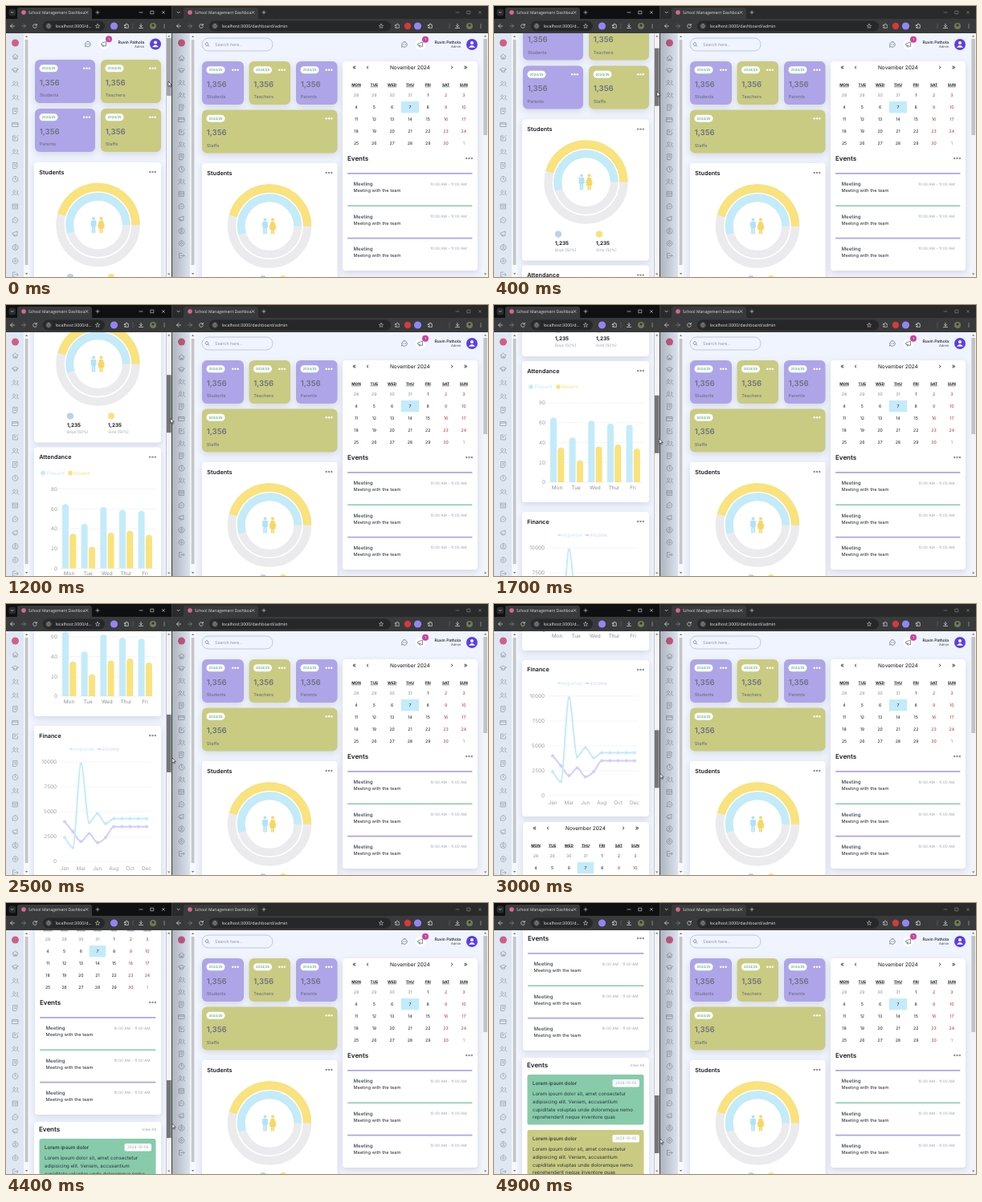
Animation of 600x338 px, one loop 5000 ms. Source, as an HTML page:

```html
<!DOCTYPE html>
<html lang="en">
<head>
<meta charset="utf-8">
<title>School Management Dashboard</title>
<style>
html, body { margin: 0; width: 100%; height: 100%; overflow: hidden; background: #0c0d0e; }
svg { display: block; width: 100vw; height: 100vh; }
text { font-family: Inter, sans-serif; white-space: pre; text-rendering: geometricPrecision; }
.chrome text { font-family: "Open Sans", sans-serif; }
.card { filter: drop-shadow(0 3px 4px #0000001c); }
.line { fill: none; stroke-linecap: round; stroke-linejoin: round; }
</style>
</head>
<body>
<svg id="stage" viewBox="0 0 600 338"></svg>
<script>
const PURPLE = '#aea5e8', OLIVE = '#c9cb82', GREEN = '#87cbaa', SKY = '#c3ebfa',
  YELLOW = '#fae27c', LILAC = '#cfceff', GRAY = '#6b7280', PALE = '#9ca3af', INK = '#15171c', PAGE = '#f0f4fe';

const rect = (x, y, w, h, fill, r = 0, extra = '') =>
  `<rect x="${x}" y="${y}" width="${w}" height="${h}" rx="${r}" fill="${fill}" ${extra}/>`;
const card = (x, y, w, h, fill = '#fff', r = 4) => rect(x, y, w, h, fill, r, 'class="card"');
const dot = (x, y, r, fill, extra = '') => `<circle cx="${x}" cy="${y}" r="${r}" fill="${fill}" ${extra}/>`;
const line = (d, stroke, w = .7, extra = '') =>
  `<path class="line" d="${d}" stroke="${stroke}" stroke-width="${w}" ${extra}/>`;
// y is the vertical middle of the text
const text = (x, y, s, size, fill = INK, weight = 400, anchor = 'start', extra = '') =>
  `<text x="${x}" y="${y}" dy=".36em" font-size="${size}" fill="${fill}" font-weight="${weight}" text-anchor="${anchor}" ${extra}>${s}</text>`;
const icon = (x, y, d, stroke = GRAY, w = .7) => line(d, stroke, w, `transform="translate(${x} ${y})"`);
const more = (right, y, fill = '#8b8f98') => [0, 3.3, 6.6].map(d => dot(right - 1.2 - d, y, 1.2, fill)).join('');
const each = (list, f) => list.map(f).join('');

const ICON = {
  home: 'M-3.5 0L0-3.2 3.5 0M-2.5-1V3H2.5V-1M-.7 3V1H.7V3',
  cap: 'M-4-1L0-3 4-1 0 1zM-2 0V2Q0 3.5 2 2V0',
  users: 'M-1.5-3a1.5 1.5 0 1 0 .1 0M-4 3Q-1.5-1 1 3M2-2.5a1.3 1.3 0 0 1 0 2.6M2 1Q3.5 1 4 3',
  doc: 'M-2.5-3.5H2.5V1L1 3.5H-2.5zM-1-1.5H1M-1 .5H1',
  pay: 'M-3.5-2.5H3.5V2.5H-3.5zM-3.5-.8H3.5',
  edit: 'M3 0V3H-3V-3H0M-1 1L3.5-3.5M-1.5-1H0',
  clock: 'M0-3.5a3.5 3.5 0 1 0 .1 0M0-2V0L1.5 1',
  calendar: 'M-3-3H3V3H-3zM-3-1H3M-1.5 1H1.5',
  chat: 'M0-3.3a3.3 3.3 0 1 1-2.2 5.8L-3.4 3.2-3 1.5A3.3 3.3 0 0 1 0-3.3M-1.4 0h.2M0 0h.2M1.4 0h.2',
  news: 'M-3-1L2.5-3V2.5L-3 1zM-2 1.2L-1.5 3H0',
  user: 'M0-3.6a3.6 3.6 0 1 0 .1 0M0-2a1.2 1.2 0 1 0 .1 0M-2.2 2.6Q0-.2 2.2 2.6',
  gear: 'M0-3.4a3.4 3.4 0 1 0 .1 0M0-1.3a1.3 1.3 0 1 0 .1 0',
  exit: 'M0-3H-3V3H0M-1 0H3.5M2-1.5L3.5 0 2 1.5',
  back: 'M2.5 0H-2.5M0-2.5L-2.5 0 0 2.5',
  forward: 'M-2.5 0H2.5M0-2.5L2.5 0 0 2.5',
  reload: 'M2-1.3A2.4 2.4 0 1 0 2.3.8M2.3-2.6V-1H.7',
  info: 'M0-2.2a2.2 2.2 0 1 0 .1 0M0-.2V1M0-1.1v.1',
  star: 'M0-2.7L.8-.8 2.7-.7 1.2.6 1.7 2.5 0 1.5-1.7 2.5-1.2.6-2.7-.7-.8-.8z',
  puzzle: 'M-2.3-1.4H-.6a1 1 0 1 1 1.6 0H2.3V2.4H-2.3V1.2a1 1 0 1 0 0-1.4z',
  save: 'M0-2.7V1M-1.7-.6L0 1.1 1.7-.6M-2.5 2.5H2.5',
  menu: 'M0-2v.1M0 0v.1M0 2v.1',
  close: 'M-1.5-1.5L1.5 1.5M1.5-1.5L-1.5 1.5',
  plus: 'M-2 0H2M0-2V2',
  min: 'M-2 0H2',
  max: 'M-1.8-1.8H1.8V1.8H-1.8z',
  down: 'M-1.5-.7L0 .8 1.5-.7'
};
const MENU = ['home', 'cap', 'users', 'users', 'doc', 'pay', 'edit', 'users', 'doc', 'clock',
  'users', 'calendar', 'chat', 'news', 'user', 'gear', 'exit'];

// monotone cubic tangents through [x, y] points
function slopes(p) {
  const d = p.slice(1).map((q, i) => (q[1] - p[i][1]) / (q[0] - p[i][0]));
  return p.map((_, i) => {
    const a = d[i - 1] ?? d[i], b = d[i] ?? a;
    return a * b <= 0 ? 0 : Math.sign(a) * Math.min(2 * Math.abs(a), 2 * Math.abs(b), Math.abs(a + b) / 2);
  });
}

function browser(x, w, url, pill, star, strip) {
  const ctl = '#e3e3e3', end = x + w, frame = x ? '#8d8e90' : ctl;
  let s = rect(x, 0, w, 17, strip) + rect(x, 16, w, 18, '#393a3b') +
    `<path d="M${x + 12} 17Q${x + 14} 17 ${x + 14} 14V5Q${x + 14} 2 ${x + 17} 2H${x + 104}Q${x + 107} 2 ${x + 107} 5V14Q${x + 107} 17 ${x + 109} 17z" fill="#393a3b"/>` +
    rect(x + 3.5, 3.5, 8.5, 9, '#2b2c2d', 3) + icon(x + 7.7, 8, ICON.down, ctl) +
    dot(x + 22, 8, 2.8, '#d9678f') + text(x + 28, 8, 'School Management Dashboa', 5.05, ctl) +
    icon(x + 100.5, 8, ICON.close, ctl, .6) + icon(x + 114, 8, ICON.plus, ctl, .6) +
    icon(end - 38, 8, ICON.min, frame, .6) + icon(end - 24, 8, ICON.max, frame, .6) + icon(end - 10, 8, ICON.close, frame, .6) +
    icon(x + 8, 25, ICON.back, ctl) + icon(x + 22, 25, ICON.forward, '#85878a') + icon(x + 36, 25, ICON.reload, ctl) +
    rect(x + 46, 18.5, pill, 13, '#262728', 6.5) + dot(x + 53, 25, 4.3, '#3c3d3e') + icon(x + 53, 25, ICON.info, ctl, .5) +
    text(x + 61.5, 25, url, 5.3, '#e8e8e8') + icon(star, 25, ICON.star, ctl, .5);
  const puzzle = x ? end - 72 : 150;
  s += dot(puzzle - 15.5, 25, 4.6, '#9384f5') + icon(puzzle, 25, ICON.puzzle, ctl) +
    line(`M${end - 48} 22V28`, '#6a6c6e', .6) + icon(end - 38, 25, ICON.save, ctl) +
    dot(end - 23, 25, 4, '#6d7b55') + dot(end - 23, 24, 1.5, '#38302a') + icon(end - 9, 25, ICON.menu, ctl, 1);
  if (x) s += icon(487, 25, ICON.puzzle, '#c8c8c8') + dot(500, 25, 4.2, '#d8383a');
  return `<g class="chrome">${s}</g>`;
}

const arrow = (x, y, k) => `<path d="M${x - 1.7} ${y + k}h3.4L${x} ${y - k}z" fill="#777"/>`;

function sidebar(x, top, step) {
  return rect(x, 34, 22, 304, '#dfe7f3') + dot(x + 11.5, 46, 4.5, '#cf5f88') +
    each(MENU, (n, i) => icon(x + 11.5, top + step * i, ICON[n], '#8a92a0', .65)) +
    rect(x + 22, 34, 7, 304, '#f6f8fb') + rect(x + 23.7, 42, 3.8, 281, '#c3c5c8') +
    arrow(x + 25.6, 38, 1) + arrow(x + 25.6, 334, -1);
}

function header(x, y) {
  return icon(x - 84, y, ICON.chat, '#566', .7) + dot(x - 64, y, 6.5, '#fff') + icon(x - 64, y, ICON.news, '#566') +
    dot(x - 58, y - 6.2, 4, '#c9419f') + text(x - 58, y - 6.2, '1', 4, '#fff', 500, 'middle') +
    text(x - 14, y - 2.7, 'Ruvin Pathola', 5, INK, 500, 'end') + text(x - 14, y + 2.6, 'Admin', 4, '#444', 400, 'end') +
    dot(x, y, 7, '#5b3fe6') + dot(x, y - 2, 2, '#fff') + `<path d="M${x - 4} ${y + 3.7}Q${x} ${y - 1.6} ${x + 4} ${y + 3.7}z" fill="#fff"/>`;
}

function stat(x, y, w, label, fill) {
  return card(x, y, w, 54, fill, 6) + rect(x + 5.5, y + 6.2, 23, 9, '#fff', 4.5) +
    text(x + 17, y + 10.7, '2024/25', 4.2, '#4fa87a', 500, 'middle') + more(x + w - 6, y + 10.7, '#fff') +
    text(x + 5.7, y + 28.3, '1,356', 9.6, GRAY, 600) + text(x + 5.7, y + 44.2, label, 5.6, GRAY, 500);
}

const panel = (x, y, w, h, title) =>
  card(x, y, w, h) + text(x + 6.3, y + 12, title, 7.2, INK, 600) + more(x + w - 6, y + 12);

function arc(x, y, r, w, deg, color) {
  const a = deg * Math.PI / 180;
  return dot(x, y, r, 'none', `stroke="#ebebed" stroke-width="${w}"`) +
    `<path d="M${x + r} ${y}A${r} ${r} 0 ${+(deg > 180)} 0 ${x + r * Math.cos(a)} ${y - r * Math.sin(a)}" fill="none" stroke="${color}" stroke-width="${w}"/>`;
}

function donut(x, y) {
  return arc(x, y, 47, 10.4, 164.5, YELLOW) + arc(x, y, 35.2, 9.8, 196, SKY) +
    `<g transform="translate(${x - 5.5} ${y})" fill="#b3e2f5">` + dot(0, -8, 2, '#b3e2f5') +
    `<path d="M-3.4-4.5Q-3.4-5.5-2.4-5.5H2.4Q3.4-5.5 3.4-4.5V2H2.2V10H.3V3H-.3V10H-2.2V2H-3.4z"/></g>` +
    `<g transform="translate(${x + 4} ${y})" fill="#f7d765">` + dot(0, -8, 2, '#f7d765') +
    `<path d="M-2-5.5H2L4.6 1.5 3.4 2 3 1 4 4.5H2V10H.3V5H-.3V10H-2V4.5H-4L-3 1-3.4 2-4.6 1.5z"/></g>`;
}

function attendance() {
  const base = 528, k = 99 / 80;
  const days = [['Mon', 65, 35], ['Tue', 45, 22], ['Wed', 62, 36], ['Thur', 59, 38], ['Fri', 58, 34]];
  const bar = (x, v, c) => `<path d="M${x} ${base}v${4 - v * k}q0-4 4-4t4 4V${base}z" fill="${c}"/>`;
  return panel(35, 377, 158, 176, 'Attendance') +
    dot(46, 409, 2.8, SKY) + text(50.5, 409, 'Present', 6.2, SKY) + dot(80, 409, 2.8, YELLOW) + text(84, 409, 'Absent', 6.2, YELLOW) +
    each([0, 20, 40, 60, 80], v => line(`M67 ${base - v * k}H186`, '#ddd', .4, v ? 'stroke-dasharray="1.2 1.2"' : '') +
      text(64, base - v * k, v, 6.4, '#a0a3a8', 400, 'end')) +
    each(days, ([d, a, b], i) => {
      const x = 78.5 + 23.65 * i;
      return bar(x - 8.5, a, SKY) + bar(x + .8, b, YELLOW) + text(x, 534.5, d, 6.4, '#8d9096', 400, 'middle');
    });
}

function curve(values, color) {
  const p = values.map((v, i) => [73 + 10.2 * i, 734 - v * .0124]), m = slopes(p), h = 3.4;
  const d = each(p, ([x, y], i) => i
    ? `C${x - 2 * h} ${p[i - 1][1] + m[i - 1] * h} ${x - h} ${y - m[i] * h} ${x} ${y}` : `M${x} ${y}`);
  return line(d, color, 2) + each(p, ([x, y]) => dot(x, y, 1.4, color, `stroke="${color}" stroke-width="1.2"`));
}

function finance() {
  const key = (x, s, c) => line(`M${x} 594h5`, c, 1) + dot(x + 2.5, 594, 1.2, c) + text(x + 6, 594, s, 6.2, c);
  const flat = v => Array(5).fill(v);
  return panel(35, 565, 158, 195, 'Finance') + key(79, 'expense', SKY) + key(113.5, 'income', LILAC) +
    each([0, 2500, 5000, 7500, 10000], v => line(`M68 ${734 - v * .0124}H180`, '#e3e3e3', .4) +
      text(63, 734 - v * .0124, v, 6.4, '#a0a3a8', 400, 'end')) +
    each(['Jan', 'Mar', 'Jun', 'Aug', 'Oct', 'Dec'], (m, i) => text(73 + 20.4 * i, 742.5, m, 6.4, '#a0a3a8', 400, 'middle')) +
    curve([4000, 3000, 2000, 2780, 1890, 2390, ...flat(3490)], LILAC) +
    curve([2400, 1398, 9800, 3908, 4800, 3800, ...flat(4300)], SKY);
}

// y is the middle of the month row
function calendar(x, y, w, first, step) {
  const mid = first + 3 * step, right = x + w, col = i => first + step * i;
  const nav = (at, s) => text(at, y - .5, s, 8, INK, 400, 'middle');
  return card(x, y - 8, w, 261) +
    nav(x + 14.5, '«') + nav(x + 31, '‹') + nav(right - 32, '›') + nav(right - 15, '»') +
    text(mid, y, 'November 2024', 6.5, INK, 400, 'middle') +
    each(['MON', 'TUE', 'WED', 'THU', 'FRI', 'SAT', 'SUN'], (d, i) =>
      text(col(i), y + 21, d, 4.7, INK, 700, 'middle', 'text-decoration="underline"')) +
    rect(mid - step / 2, y + 42, step, 14.4, SKY) +
    each([...Array(35).keys()], i => {
      const out = i < 4 || i > 33, n = i < 4 ? 28 + i : i > 33 ? 1 : i - 3;
      return text(col(i % 7), y + 34 + 15 * Math.floor(i / 7), n, 5.2, out ? '#85878c' : i % 7 > 4 ? '#b3262b' : INK, 400, 'middle');
    }) +
    text(x + 6, y + 113, 'Events', 8, INK, 600) + more(right - 6, y + 113) +
    each([PURPLE, GREEN, PURPLE], (c, i) => {
      const top = y + 131 + 40.4 * i;
      return rect(x + 6, top, w - 12.5, 1.7, c, .8) +
        text(x + 13.5, top + 14, 'Meeting', 6.1, '#4b5563', 600) +
        text(right - 13.5, top + 14, '10:00 AM - 11:00 AM', 4.7, PALE, 400, 'end') +
        text(x + 13.5, top + 22.4, 'Meeting with the team', 5.6, '#25282d');
    });
}

function notice(y, fill) {
  const body = ['Lorem ipsum dolor sit, amet consectetur', 'adipisicing elit. Veniam, accusantium',
    'cupiditate voluptas unde doloremque nemo', 'reprehenderit neque inventore quas'];
  return rect(41.5, y, 145, 62.5, fill, 2.5) + text(48, y + 11, 'Lorem ipsum dolor', 6.2, '#252e3b', 500) +
    rect(147.5, y + 6, 33.5, 9.6, '#fff', 2) + text(164.3, y + 10.8, '2024-10-05', 4.7, PALE, 400, 'middle') +
    each(body, (s, i) => text(48, y + 24 + 9.7 * i, s, 6.1, '#2b3440'));
}

const amount = (x, c, label) => dot(x + 4, 338, 4.1, c) + text(x, 348.7, '1,235', 6.4, INK, 700) + text(x, 357.7, label, 4.8, PALE);

const narrow = header(186, 47.5) +
  stat(36, 67, 75, 'Students', PURPLE) + stat(118, 67, 75, 'Teachers', OLIVE) +
  stat(36, 128, 75, 'Parents', PURPLE) + stat(118, 128, 75, 'Staffs', OLIVE) +
  panel(35, 195, 158, 176, 'Students') + donut(114.5, 273) +
  amount(76, '#bcd0f0', 'Boys (50%)') + amount(127, YELLOW, 'Girls (50%)') +
  attendance() + finance() + calendar(36, 775, 157, 52, 20.65) +
  card(35, 1037, 158, 230) + text(41, 1046, 'Events', 8, INK, 600) + text(187, 1046, 'View All', 4.7, PALE, 400, 'end') +
  notice(1058, GREEN) + notice(1127, OLIVE);

const wide = rect(244, 40, 88, 16, 'none', 8, 'stroke="#b4bfd0" stroke-width=".8"') +
  icon(250.5, 48, 'M-.5-2.3a1.9 1.9 0 1 0 .1 0M1 1L2.4 2.4') + text(260, 48, 'Search here...', 5.3, '#8d95a5') +
  header(580, 48) +
  stat(244, 69, 52, 'Students', PURPLE) + stat(302.5, 69, 51.5, 'Teachers', OLIVE) +
  stat(361, 69, 51.5, 'Parents', PURPLE) + stat(244, 129.5, 168.5, 'Staffs', OLIVE) +
  panel(244, 196, 168.5, 176, 'Students') + donut(328, 274.5) +
  dot(320, 340, 4.1, '#bcd0f0') + dot(345, 340, 4.1, YELLOW) +
  calendar(419, 77, 168, 436, 22.3);

document.getElementById('stage').innerHTML =
  `<clipPath id="left"><rect x="29" y="34" width="170.5" height="304"/></clipPath>
   <clipPath id="right"><rect x="236" y="34" width="358" height="304"/></clipPath>
   <linearGradient id="shade"><stop stop-opacity=".22"/><stop offset="1" stop-opacity="0"/></linearGradient>` +
  rect(0, 0, 600, 338, '#3a3b3c') +
  browser(0, 206, 'localhost:3000/d...', 77, 114, '#0f1011') +
  browser(207, 393, 'localhost:3000/dashboard/admin', 226, 467, '#2a2a2b') +
  rect(29, 34, 170.5, 304, PAGE) + rect(235, 34, 359, 304, PAGE) +
  sidebar(0, 63, 17) + sidebar(207, 65, 15.4) +
  `<g clip-path="url(#left)"><g id="page">${narrow}</g></g><g clip-path="url(#right)">${wide}</g>` +
  rect(207, 34, 24, 304, 'url(#shade)') +
  rect(199.5, 34, 6.5, 304, '#f3f4f6') + arrow(202.7, 37.5, 1) + arrow(202.7, 334.5, -1) +
  rect(593.5, 34, 6.5, 304, '#f3f4f6') + arrow(596.7, 37.5, 1) + arrow(596.7, 334.5, -1) +
  rect(594.3, 41, 4.8, 120, '#c1c3c5') +
  rect(200, 40, 5.6, 72, '#777', 0, 'id="thumb"') +
  '<path id="cursor" d="M0 0V6.4L1.5 5 2.5 7.2 3.5 6.7 2.5 4.6H4.5z" fill="#fff" stroke="#111" stroke-width=".6"/>';

const page = document.getElementById('page'), thumb = document.getElementById('thumb'), cursor = document.getElementById('cursor');
const scrollKeys = [[0, 0], [800, 114], [1700, 307], [2500, 413], [3600, 604], [4400, 764], [4900, 844]];
const tangents = slopes(scrollKeys);

function scrollAt(t) {
  const i = Math.min(scrollKeys.findLastIndex(k => k[0] <= t), scrollKeys.length - 2);
  const [t0, a] = scrollKeys[i], [t1, b] = scrollKeys[i + 1], h = t1 - t0, u = (t - t0) / h, v = 1 - u;
  return a * v * v * (1 + 2 * u) + b * u * u * (1 + 2 * v) + h * u * v * (tangents[i] * v - tangents[i + 1] * u);
}

function draw(now) {
  const t = Math.floor(now % 5000 / 100) * 100, y = scrollAt(t), drag = y * .237;
  page.setAttribute('transform', `translate(0 ${-y})`);
  thumb.setAttribute('y', 40 + drag);
  thumb.setAttribute('fill', t ? '#737577' : '#a3a5a8');
  cursor.setAttribute('transform', `translate(${202 + Math.min(4.8, t / 450)} ${94 + drag})`);
}

const start = performance.now();
function tick() {
  draw(performance.now() - start);
  requestAnimationFrame(tick);
}
tick();
</script>
</body>
</html>
```
